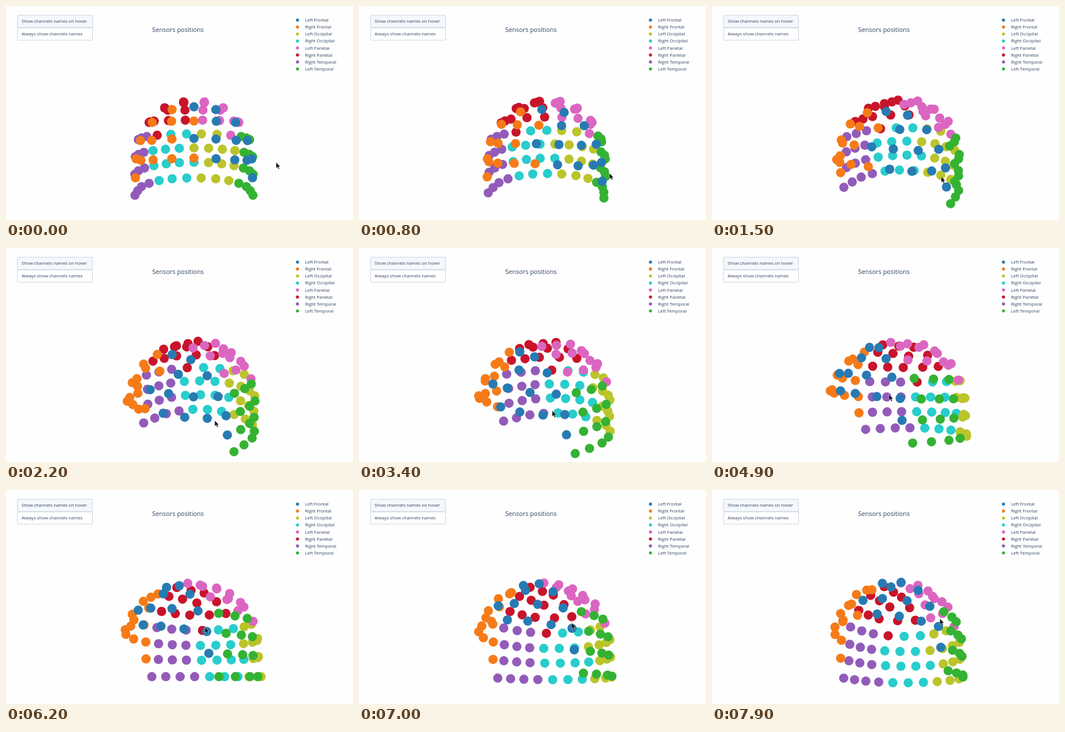
These frames come from a looping animation (600x371 px, 8 s). An HTML page:

```html
<!DOCTYPE html>
<html lang="en">
<head>
<meta charset="utf-8">
<title>Sensors positions</title>
<style>
  html, body { margin: 0; width: 100%; height: 100%; overflow: hidden; background: #fefefe; }
  svg { display: block; width: 600px; height: 371px; }
  text { font: 7.68px "Open Sans", Verdana, sans-serif; fill: #2f4361; }
  .title { font-size: 10.88px; }
  .button { stroke: #bec8d9; stroke-width: .8; }
</style>
</head>
<body>
<svg viewBox="0 0 600 371">
  <rect class="button" x="20" y="16" width="129.6" height="21.3" rx="1" fill="#f4f7fc"/>
  <rect class="button" x="20" y="37.9" width="129.6" height="21.3" rx="1" fill="#fff"/>
  <text x="27" y="28.9">Show channels names on hover</text>
  <text x="27" y="50.9">Always show channels names</text>
  <text class="title" x="297.3" y="45" text-anchor="middle">Sensors positions</text>
  <g id="legend"></g>
  <g id="sensors"></g>
  <path id="cursor" d="M0 0V10.2L2.4 8 4.2 11.9 5.9 11.1 4.2 7.4H7.3Z" fill="#111" stroke="#eee" stroke-width=".5"/>
</svg>
<script>
const LOOP = 8000, STEP = 100;
const CENTER = { x: 325, y: 248 }, DISTANCE = 600;

// Keys: first letter is the side, second the region.
const groups = {
  LF: ['Left Frontal', '#287bb2'],
  RF: ['Right Frontal', '#f67b18'],
  LO: ['Left Occipital', '#bbc42b'],
  RO: ['Right Occipital', '#28cdcc'],
  LP: ['Left Parietal', '#db66c1'],
  RP: ['Right Parietal', '#c8142b'],
  RT: ['Right Temporal', '#935bb9'],
  LT: ['Left Temporal', '#34b233']
};

// Helmet rows: height, regions, then x,y (left half) from back to front.
// A lower-case region marks a midline sensor owned by the right side.
const rows = [
  [-75, 'OOOTTTT', 15,-115, 45,-107, 70,-89, 87,-64, 97.5,-36, 99.5,-4, 99,27],
  [-42, 'oOOOTTTF', 0,-117, 30,-112, 56,-97, 78.5,-75, 93,-48, 100,-19, 101,12, 95,42],
  [-12, 'OOOOTTTFFFFf', 0,-117, 30,-111, 57,-95, 79.5,-73, 93.5,-47, 99,-18, 99.5,13,
    93,44, 80.5,75, 59,100, 31,114, 0,119],
  [18, 'OOPTTTFFFF', 15,-105, 46,-93, 71,-72, 87,-43, 92,-12, 92.5,21, 84,53,
    62.5,84, 31.5,102, 0,107],
  [46.5, 'PPPPPFFf', 17,-88, 49,-72.5, 73,-42, 76,-10, 74,22, 65,54, 33,81.5, 0,85],
  [66.5, 'PPF', 17,-65, 47.6,-41, 34,53],
  [70.5, 'PPF', 50.6,-9.7, 48,22, 0,56],
  [80, 'PPP', 18.6,-36.6, 17.3,-6, 17,25]
];

// Time, yaw and pitch of the view in degrees, pointer x and y.
const keys = [
  [0, 0, 7, 467, 271],
  [800, 8, 11, 433, 290],
  [2200, 37, 17, 361, 299],
  [2800, 45, 18.5, 345, 300],
  [3400, 50, 14, 334, 282],
  [4900, 64.5, 0, 306, 254],
  [6200, 54.4, -7.2, 344, 238],
  [7900, 31, -13.5, 394, 223]
];

const byId = id => document.getElementById(id);

function addTo(parent, tag, attrs, text = '') {
  const el = document.createElementNS('http://www.w3.org/2000/svg', tag);
  for (const name in attrs) el.setAttribute(name, attrs[name]);
  el.textContent = text;
  return parent.appendChild(el);
}

Object.values(groups).forEach(([label, fill], i) => {
  const y = 24.4 + i * 12.1;
  addTo(byId('legend'), 'circle', { cx: 504, cy: y, r: 2.7, fill });
  addTo(byId('legend'), 'text', { x: 517, y: y + 2.7 }, label);
});

const sensors = [];
function addSensor(group, x, y, z) {
  const el = addTo(byId('sensors'), 'circle', { r: 8, fill: groups[group][1] });
  sensors.push({ el, x, y, z });
}

for (const [height, regions, ...xy] of rows) {
  [...regions].forEach((letter, i) => {
    const x = xy[2 * i], y = xy[2 * i + 1], region = letter.toUpperCase();
    // Rows curve upwards towards the forehead.
    const z = height + (height > -40 ? 14 * ((y + 117) / 236) ** 6 : 0);
    if (x) {
      addSensor('L' + region, x, y, z);
      addSensor('R' + region, -x, y, z);
    } else {
      addSensor((letter === region ? 'L' : 'R') + region, 0, y, z);
    }
  });
}

// Cubic curve through the keys, with uneven spacing.
function valueAt(time, col) {
  let i = keys.findIndex(k => k[0] > time) - 1;
  if (i < 0) i = keys.length - 2;
  const slope = n => {
    const a = keys[Math.max(n - 1, 0)], b = keys[Math.min(n + 1, keys.length - 1)];
    return (b[col] - a[col]) / (b[0] - a[0]);
  };
  const a = keys[i], b = keys[i + 1], span = b[0] - a[0];
  const u = (time - a[0]) / span, v = 1 - u;
  return v * v * (1 + 2 * u) * a[col] + u * u * (1 + 2 * v) * b[col]
    + u * v * span * (v * slope(i) - u * slope(i + 1));
}

function draw(time) {
  const yaw = valueAt(time, 1) * Math.PI / 180, pitch = valueAt(time, 2) * Math.PI / 180;
  const c = Math.cos(yaw), s = Math.sin(yaw), cp = Math.cos(pitch), sp = Math.sin(pitch);
  for (const p of sensors) {
    const toward = p.x * s + p.y * c;
    p.depth = toward * cp + p.z * sp;
    const scale = DISTANCE / (DISTANCE - p.depth);
    p.el.setAttribute('cx', CENTER.x + (p.x * c - p.y * s) * scale);
    p.el.setAttribute('cy', CENTER.y - (p.z * cp - toward * sp) * scale);
  }
  sensors.sort((a, b) => a.depth - b.depth);
  byId('sensors').append(...sensors.map(p => p.el));
  byId('cursor').setAttribute('transform', `translate(${valueAt(time, 3)} ${valueAt(time, 4)})`);
}

const start = performance.now();
function tick() {
  const time = (performance.now() - start) % LOOP;
  draw(Math.floor(time / STEP) * STEP);
  requestAnimationFrame(tick);
}
tick();
</script>
</body>
</html>
```
